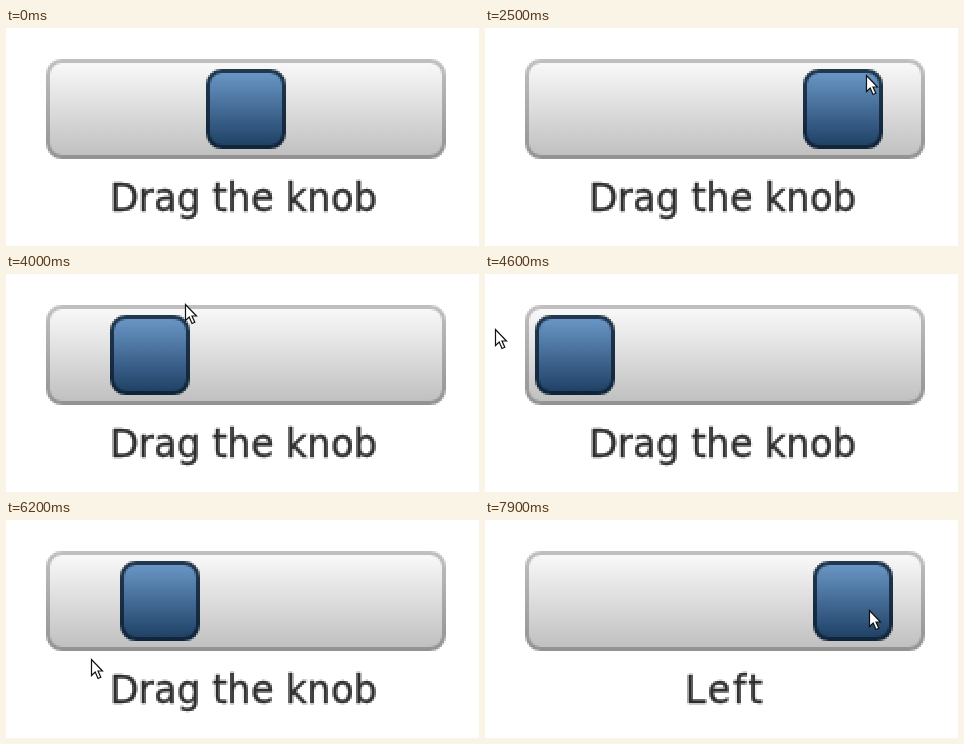
An HTML page with a canvas for the animation above (8000 ms loop, 473 px wide and 218 px high).

```html
<!DOCTYPE html>
<html lang="en">
<head>
<meta charset="utf-8">
<title>Drag the knob</title>
<style>
  html, body { margin: 0; width: 100%; height: 100%; overflow: hidden; background: #fff; }
  canvas, svg { position: absolute; left: 0; }
  canvas { top: -1px; width: 474px; height: 220px; image-rendering: pixelated; }
  svg { top: 0; width: 473px; height: 218px; }
</style>
</head>
<body>
<canvas id="scene" width="237" height="110"></canvas>
<svg viewBox="0 0 473 218">
  <path id="pointer" d="M.5 1.5V17.5L4.2 14 7 20.5 9.8 19.3 7 13H11.5Z" fill="#fff" stroke="#111" stroke-width="1.2"/>
</svg>
<script>
const LOOP = 8000, STEP = 100;
const HOME = 200, LEFT_END = 50, RIGHT_END = 350;
const PRESS = 1300, DRAG = 1700, RELEASE = 6200, REGRAB = 7000;

const ctx = document.getElementById("scene").getContext("2d");
const pointer = document.getElementById("pointer");
const clamp = (v, min, max) => Math.min(max, Math.max(min, v));

// Turning points of the hand: time, x, y
const turns = [
  [1600, 231, 76], [2500, 381, 46], [3000, 452, 112], [3400, 400, 60],
  [4000, 179, 29], [4500, 12, 40], [5300, 108, 183], [5700, 201, 150],
  [6200, 85, 138], [7000, 256, 98], [7900, 384, 89]
];

function slope(i, axis) {
  const before = turns[i - 1], after = turns[i + 1];
  return before && after ? (after[axis] - before[axis]) / (after[0] - before[0]) : 0;
}

// Smooth cubic through the turning points
function handAt(time, axis) {
  const found = turns.findIndex(p => p[0] > time);
  const i = (found < 0 ? turns.length - 1 : found) - 1;
  const [a, b] = [turns[i], turns[i + 1]];
  const span = b[0] - a[0], u = Math.min(1, (time - a[0]) / span), v = 1 - u;
  return v * v * (1 + 2 * u) * a[axis] + u * u * (1 + 2 * v) * b[axis]
    + u * v * span * (v * slope(i, axis) - u * slope(i + 1, axis));
}

function pointerAt(time) {
  if (time >= turns[0][0]) return [handAt(time, 1), handAt(time, 2)];
  const entry = clamp((time - 300) / 400, 0, 1);
  return [220 + 11 * entry, -4 + 80 * entry];
}

function knobAt(time, x) {
  if (time < DRAG) return HOME;
  if (time >= RELEASE && time < REGRAB)
    return HOME - 86 * 0.6 ** ((time - RELEASE) / STEP);
  const drift = Math.max(0, Math.sin(Math.PI * (time - 1600) / 3700));
  const grip = time < RELEASE ? 28 + 52 * drift : 56;
  return clamp(x - grip, LEFT_END, RIGHT_END);
}

function shade(y, height, top, bottom) {
  const gradient = ctx.createLinearGradient(0, y, 0, y + height);
  gradient.addColorStop(0, top);
  gradient.addColorStop(1, bottom);
  return gradient;
}

function panel(x, y, width, height, fill, edge) {
  ctx.beginPath();
  ctx.roundRect(x + 1, y + 1, width - 2, height - 2, 7);
  ctx.fillStyle = shade(y, height, ...fill);
  ctx.strokeStyle = shade(y, height, ...edge);
  ctx.lineWidth = 2;
  ctx.fill();
  ctx.stroke();
}

function label(text, x, spacing) {
  ctx.font = '18.67px "DejaVu Sans", sans-serif';
  ctx.letterSpacing = spacing;
  ctx.fillStyle = ctx.strokeStyle = "#2e2e2e";
  ctx.lineWidth = 0.3;
  ctx.fillText(text, x, 92);
  ctx.strokeText(text, x, 92);
}

function draw(time) {
  const [x, y] = pointerAt(time).map(Math.round);
  const pressed = time >= PRESS && time < DRAG;
  ctx.fillStyle = "#fff";
  ctx.fillRect(0, 0, 237, 110);
  panel(20, 16, 200, 50, ["#fbfbfb", "#bebebe"], ["#c0c0c0", "#929292"]);
  panel(Math.round(knobAt(time, x) / 2), 21, 40, 40,
    pressed ? ["#305d91", "#12283f"] : ["#6d9aca", "#1c3d61"], ["#22384f", "#10243a"]);
  if (time > RELEASE) label("Left", 100, "1.25px");
  else label("Drag the knob", 52, "0px");
  pointer.setAttribute("transform", `translate(${x} ${y})`);
  pointer.setAttribute("visibility", time < 300 ? "hidden" : "visible");
}

const start = performance.now();
function tick() {
  const time = (performance.now() - start) % LOOP;
  draw(Math.floor(time / STEP) * STEP);
  requestAnimationFrame(tick);
}
draw(0);
requestAnimationFrame(tick);
</script>
</body>
</html>
```
